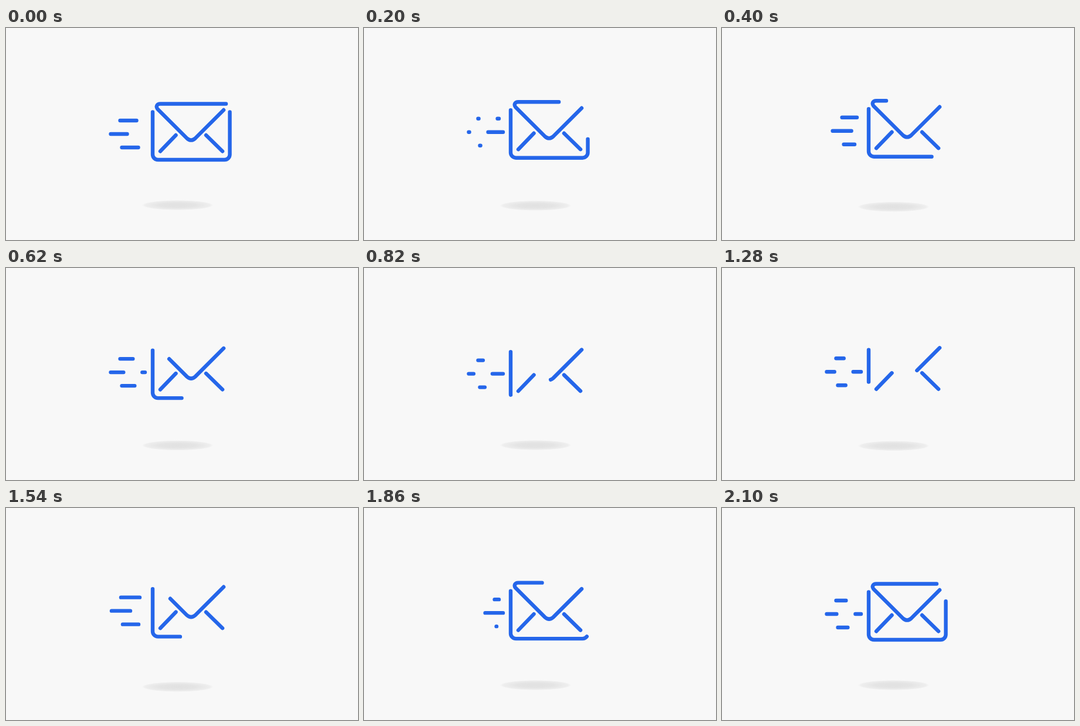
Recreate the animation shown at these times as an HTML page. Size 600 by 362 pixels, loop 2120 ms.

```html
<!DOCTYPE html>
<html>
<head>
<meta charset="utf-8">
<style>
html, body { margin: 0; width: 100%; height: 100%; overflow: hidden; background: #f8f8f8; }
svg { display: block; }
</style>
</head>
<body>
<svg width="600" height="362" viewBox="0 0 600 362">
  <defs>
    <radialGradient id="soft">
      <stop offset="0" stop-color="#e1e1e1"/>
      <stop offset=".5" stop-color="#e4e4e4"/>
      <stop offset=".9" stop-color="#eeeeee"/>
      <stop offset="1" stop-color="#f8f8f8"/>
    </radialGradient>
  </defs>
  <ellipse id="shadow" cx="292.5" cy="303" rx="61" ry="8.5" fill="url(#soft)"/>
  <g id="mail" fill="none" stroke="#2566ea" stroke-width="6.4" stroke-linecap="round">
    <g id="envelope">
      <path d="M250 143V215.5a9 9 0 0 0 9 9H372.5a9 9 0 0 0 9-9V143"/>
      <path d="M371 139.5L322.5 188Q315.5 194 308.5 188L258.5 138C255 134 257 129 263 129H375"/>
      <path d="M289.5 182.5L263 210"/>
      <path d="M341 182.5L369 210"/>
    </g>
    <g id="trails" stroke-dasharray="32 32">
      <path d="M194.5 157.5H230"/>
      <path d="M178.5 180.5H237"/>
      <path d="M197.5 203.5H226"/>
    </g>
  </g>
</svg>
<script>
const LOOP = 2120, TURN = 1085, LOW = .5, HIGH = -4.9;
const [shadow, mail, envelope, trails] =
  ['shadow', 'mail', 'envelope', 'trails'].map(id => document.getElementById(id));

// Times at which the floating changes direction, starting from the lowest point
const turns = [0, 350, 920, 1500, 2100, 2450];

function float(t) {
  const i = turns.findIndex(k => k > t) - 1;
  const u = (t - turns[i]) / (turns[i + 1] - turns[i]);
  const swing = Math.cos(Math.PI * (i + u));
  return (LOW + HIGH) / 2 + swing * (LOW - HIGH) / 2;
}

function draw() {
  const t = Math.floor(performance.now() % LOOP / 20) * 20;
  // Everything retracts until the turn, then grows back
  const x = Math.abs(t - TURN) / TURN;
  const flow = t < TURN ? 92 * x ** 1.7 : 87 * x ** 1.1;
  const y = float(t);
  envelope.setAttribute('stroke-dasharray', `${289 * x ** .97} 999`);
  trails.setAttribute('stroke-dashoffset', 32 - flow);
  mail.setAttribute('transform', `translate(0 ${y})`);
  shadow.setAttribute('cy', 302.5 + Math.max(0, -2 - y));
  requestAnimationFrame(draw);
}
draw();
</script>
</body>
</html>
```
